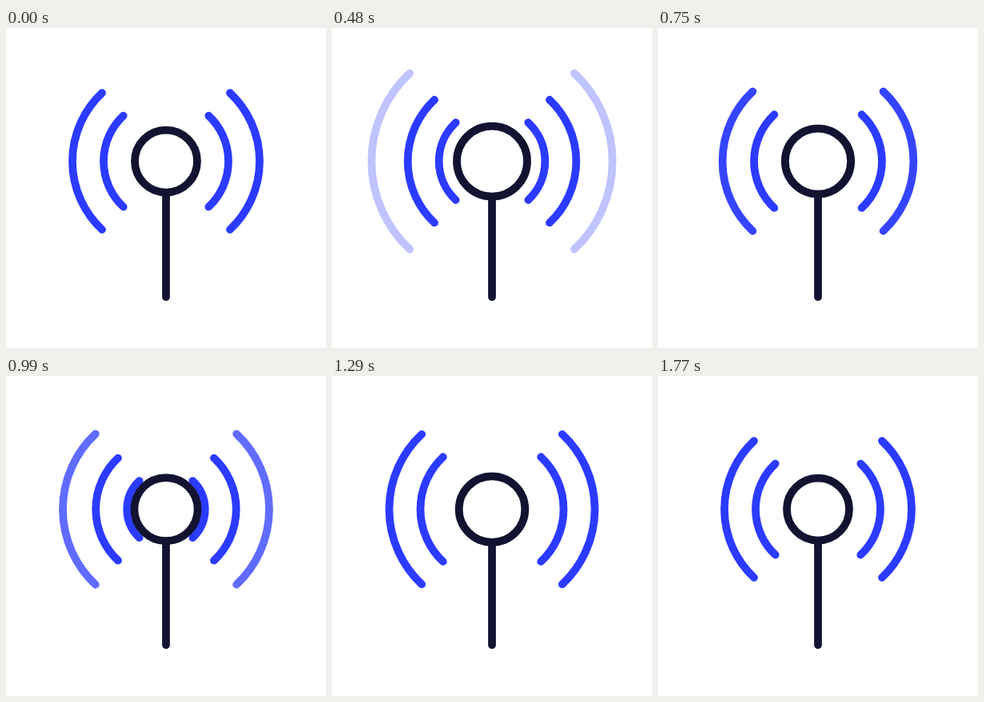
Recreate the animation shown at these times as an HTML page. Size 400x400 px, loop 4.03 s.

```html
<!DOCTYPE html>
<html lang="en">
<head>
<meta charset="utf-8">
<title>Broadcast antenna</title>
<style>
  html, body { margin: 0; width: 100%; height: 100%; overflow: hidden; background: #fff; }
  svg { display: block; width: 100vw; height: 100vh; }
</style>
</head>
<body>
<svg viewBox="0 0 400 400" fill="none" stroke-width="9.75" stroke-linecap="round">
  <g id="waves" stroke="#2b3bff"><path/><path/><path/></g>
  <g stroke="#121331">
    <path id="mast"/>
    <circle id="ring" cx="200" cy="166.6" fill="#fff"/>
  </g>
</svg>
<script>
const LOOP = 4030, STEP = 30, ACTIVE = 1770;
const CX = 200, CY = 166.6, GAP = 39, LAST_GAP = 48, WAVES = 5;
const SPREAD = 46.9 * Math.PI / 180;

// [ms, value]: number of waves sent so far, and radius of the ring
const PHASE = [[0, 0], [300, .855], [480, 1.7], [750, 3.05], [990, 4.25], [1290, 5.295], [1650, 5], [1770, 5]];
const RADIUS = [[0, 39], [300, 40], [480, 44], [750, 41.1], [990, 39.6], [1290, 41.3], [1770, 39]];

const arcs = document.querySelectorAll('#waves path');
const mast = document.getElementById('mast');
const ring = document.getElementById('ring');

// Smooth curve through the keys, flat at turning points
function slope(keys, i) {
  const a = keys[i - 1], b = keys[i], c = keys[i + 1];
  if (!a || !c || (b[1] - a[1]) * (c[1] - b[1]) <= 0) return 0;
  return (c[1] - a[1]) / (c[0] - a[0]);
}

function curve(keys, t) {
  let i = 0;
  while (i < keys.length - 2 && t >= keys[i + 1][0]) i++;
  const [t0, v0] = keys[i], [t1, v1] = keys[i + 1];
  const h = t1 - t0, u = (t - t0) / h, w = 1 - u;
  return v0 + (v1 - v0) * u * u * (3 - 2 * u)
    + h * u * w * (w * slope(keys, i) - u * slope(keys, i + 1));
}

function arcPair(r) {
  const dx = r * Math.cos(SPREAD), dy = r * Math.sin(SPREAD);
  const side = (s, sweep) =>
    `M${CX + s * dx} ${CY - dy}A${r} ${r} 0 0 ${sweep} ${CX + s * dx} ${CY + dy}`;
  return side(-1, 0) + side(1, 1);
}

function draw(ms) {
  const t = Math.min(Math.floor(ms % LOOP / STEP) * STEP, ACTIVE);
  const phase = curve(PHASE, t);
  const done = phase >= WAVES;
  const p = done ? phase - WAVES : phase % 1;

  arcs.forEach((arc, i) => {
    const outer = i === 2;
    arc.setAttribute('d', arcPair(GAP * (i + 1) + (outer && !done ? LAST_GAP : GAP) * p));
    const hidden = i === 0 && (done || p === 0);
    arc.setAttribute('opacity', hidden ? 0 : outer && !done ? 1 - p : 1);
  });

  const r = curve(RADIUS, t);
  ring.setAttribute('r', r);
  mast.setAttribute('d', `M${CX} ${CY + r}V336.4`);
}

const start = performance.now();
function tick() {
  draw(performance.now() - start);
  requestAnimationFrame(tick);
}
tick();
</script>
</body>
</html>
```
